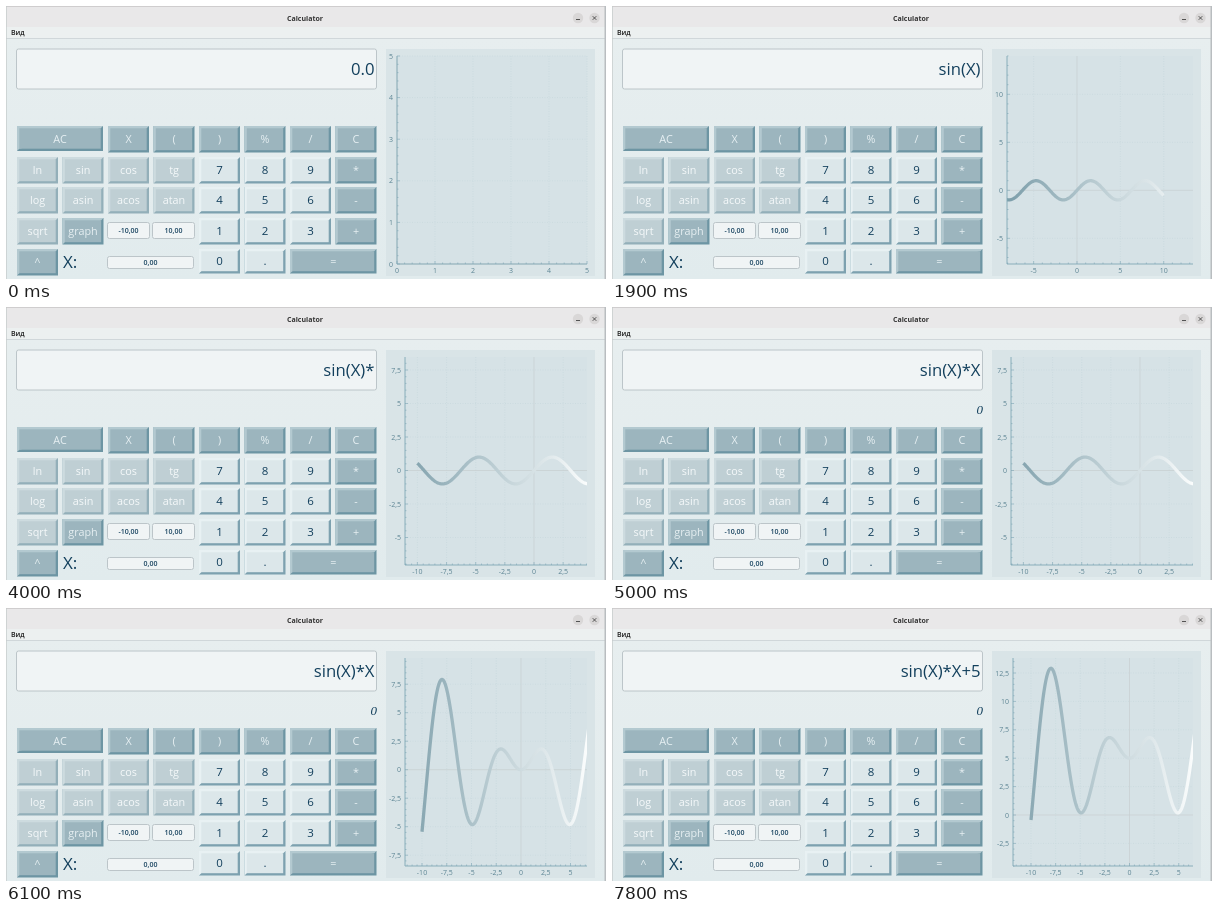
Write an HTML page with a canvas that moves like this. It is 600 px wide and 273 px high and loops after 8000 ms.

```html
<!DOCTYPE html>
<html lang="ru">
<head>
<meta charset="utf-8">
<title>Calculator</title>
<style>
  html, body { margin: 0; width: 100%; height: 100%; overflow: hidden; background: #e4ecee; }
  canvas { display: block; width: 600px; height: 273px; }
</style>
</head>
<body>
<canvas id="stage"></canvas>
<script>
const W = 600, H = 273, LOOP = 8000, STEP = 100;
const SANS = '"Open Sans", "Noto Sans", sans-serif';
const INK = '#123f5c';
const PLOT = { top: 50, right: 581, bottom: 258 };

const canvas = document.getElementById('stage');
const ctx = canvas.getContext('2d');
const dpr = window.devicePixelRatio || 1;
canvas.width = W * dpr;
canvas.height = H * dpr;
ctx.scale(dpr, dpr);

// Each view: pixels per unit and pixel position of zero, for x then y
const START = [38, 391, 41.6, 258];
const WIDE = [8.67, 465, 9.6, 184.3];
const CLOSE = [19.6, 518, 21.5, 172.5];
const MID = [11.66, 528, 13.4, 163.5];
const FAR = [4.475, 490.4, 5.01, 154];
const PEAKS = [9.9, 515, 11.4, 161.7];
const RAISED = [9.85, 517.5, 11.36, 207];

const views = [
  [0, START], [1200, START], [1900, WIDE], [2100, WIDE], [2900, CLOSE],
  [3300, MID], [5100, MID], [5600, FAR], [6100, PEAKS], [7300, PEAKS],
  [7800, RAISED], [LOOP, RAISED]
];
const typed = [
  [0, '0.0'], [400, 'sin('], [800, 'sin(X'], [1000, 'sin(X)'], [3800, 'sin(X)*'],
  [4400, 'sin(X)*X'], [6800, 'sin(X)*X+'], [7100, 'sin(X)*X+5']
];
const curves = [
  [0, null], [1300, Math.sin], [5200, x => Math.sin(x) * x], [7300, x => Math.sin(x) * x + 5]
];

const latest = (list, t) => list.filter(e => e[0] <= t).pop()[1];

// Geometric zoom around a fixed point
function zoom(s0, o0, s1, o1, k) {
  if (s0 === s1) return [s0, o0 + (o1 - o0) * k];
  const s = s0 * Math.pow(s1 / s0, k);
  return [s, o0 + (o1 - o0) * (s - s0) / (s1 - s0)];
}

function viewAt(t) {
  const i = views.findIndex(v => v[0] > t);
  const [ta, a] = views[i - 1], [tb, b] = views[i];
  const k = (t - ta) / (tb - ta);
  return [...zoom(a[0], a[1], b[0], b[1], k), ...zoom(a[2], a[3], b[2], b[3], k)];
}

function text(s, x, y, size, color, align = 'center', style = '500', family = SANS) {
  ctx.font = `${style} ${size}px ${family}`;
  ctx.fillStyle = color;
  ctx.textAlign = align;
  ctx.fillText(s, x, y);
}

function rect(x, y, w, h, color) {
  ctx.fillStyle = color;
  ctx.fillRect(x, y, w, h);
}

function line(x1, y1, x2, y2, color, width = 0.7) {
  ctx.strokeStyle = color;
  ctx.lineWidth = width;
  ctx.beginPath();
  ctx.moveTo(x1, y1);
  ctx.lineTo(x2, y2);
  ctx.stroke();
}

function field(x, y, w, h) {
  ctx.beginPath();
  ctx.roundRect(x + 0.5, y + 0.5, w - 1, h - 1, 2);
  ctx.fillStyle = '#f0f4f5';
  ctx.fill();
  ctx.strokeStyle = '#bcc5c9';
  ctx.lineWidth = 1;
  ctx.stroke();
}

const kinds = {
  dark: { face: '#9cb5be', lit: '#b3c9d0', shade: '#6d95a3', ink: '#e6eff2' },
  soft: { face: '#bfcfd4', lit: '#cddbdf', shade: '#93afb9', ink: '#f5f9fa' },
  digit: { face: '#dce7ea', lit: '#e8f1f3', shade: '#7da1af', ink: INK }
};

function button(label, x, y, w, h, kind) {
  const c = kinds[kind], b = 2.3;
  rect(x, y, w, h, c.shade);
  ctx.fillStyle = c.lit;
  ctx.beginPath();
  ctx.moveTo(x, y + h);
  ctx.lineTo(x, y);
  ctx.lineTo(x + w, y);
  ctx.lineTo(x + w - b, y + b);
  ctx.lineTo(x + b, y + h - b);
  ctx.fill();
  rect(x + b, y + b, w - 2 * b, h - 2 * b, c.face);
  text(label, x + w / 2, y + h / 2 + 4, kind === 'digit' ? 11.5 : 10.8, c.ink);
}

const COLS = [11, 56.5, 102, 147.5, 193, 238.5, 284, 329.5];
const ROWS = [120, 151, 181, 212, 243];
const keys = [
  ['', '', 'X', '(', ')', '%', '/', 'C'],
  ['ln', 'sin', 'cos', 'tg', '7', '8', '9', '*'],
  ['log', 'asin', 'acos', 'atan', '4', '5', '6', '-'],
  ['sqrt', 'graph', '', '', '1', '2', '3', '+'],
  ['^', '', '', '', '0', '.', '', '']
];

function kindOf(key) {
  if (/^[\d.]$/.test(key)) return 'digit';
  return key.length > 1 && key !== 'graph' ? 'soft' : 'dark';
}

function drawWindow() {
  const bg = ctx.createLinearGradient(0, 30, 0, H);
  bg.addColorStop(0, '#e7eeef');
  bg.addColorStop(1, '#e1ebed');
  rect(0, 0, W, H, bg);
  rect(0, 0, W, 21, '#e9e8e9');
  rect(0, 0, W, 1, '#cfcdce');
  rect(0, 21, W, 11, '#ecf0f0');
  rect(0, 32, W, 0.8, '#cbd3d5');
  rect(598.5, 0, 1.5, H, '#b9bdc0');
  rect(0, 0, 0.7, H, '#c5caca');
  text('Calculator', 299, 14.5, 7, '#343434', 'center', 'bold');
  text('Вид', 5, 29.3, 7, '#1a1a1a', 'left', '600');
  for (const x of [572, 588.5]) {
    ctx.fillStyle = '#d9d7d7';
    ctx.beginPath();
    ctx.arc(x, 12, 5.2, 0, 2 * Math.PI);
    ctx.fill();
  }
  line(570, 13.5, 574, 13.5, '#444', 0.9);
  line(586.7, 10.2, 590.3, 13.8, '#444', 0.9);
  line(590.3, 10.2, 586.7, 13.8, '#444', 0.9);
}

function drawKeys() {
  button('AC', 11, 120, 86, 25, 'dark');
  keys.forEach((row, r) => row.forEach((key, c) => {
    if (!key) return;
    const h = r === 4 && c > 0 ? 24.5 : 26.5;
    button(key, COLS[c], ROWS[r], 41, h, kindOf(key));
  }));
  button('=', 284, 243, 86.5, 24.5, 'dark');
  field(101, 216, 43, 17);
  field(146, 216, 43, 17);
  field(101, 250, 87, 13);
  text('-10,00', 122.5, 227.2, 7, INK, 'center', '600');
  text('10,00', 167.5, 227.2, 7, INK, 'center', '600');
  text('0,00', 144.5, 259.2, 7, INK, 'center', '600');
  text('X:', 57, 262, 17, INK, 'left');
}

// About five ticks, on steps of 1, 2, 2.5, 5 or 10
function tickStep(range) {
  const raw = range / 5;
  const mag = Math.pow(10, Math.floor(Math.log10(raw) + 1e-9));
  const m = [1, 2, 2.5, 5, 10].reduce((a, b) =>
    Math.abs(b - raw / mag) < Math.abs(a - raw / mag) ? b : a);
  return { step: m * mag, parts: m === 2 ? 4 : 5 };
}

function ticks(lo, hi) {
  const { step, parts } = tickStep(hi - lo);
  const sub = step / parts, eps = step * 0.01, out = [];
  for (let i = Math.ceil((lo - eps) / sub); i * sub <= hi + eps; i++) {
    out.push({ v: +(i * sub).toFixed(6), major: i % parts === 0 });
  }
  return out;
}

const label = v => String(v).replace('.', ',');

function drawPlot(view, fn) {
  const [sx, ox, sy, oy] = view;
  const { top, right, bottom } = PLOT;
  const px = x => ox + x * sx, py = y => oy - y * sy;
  const yTicks = ticks((oy - bottom) / sy, (oy - top) / sy);
  ctx.font = `7px ${SANS}`;
  const widest = Math.max(...yTicks.filter(t => t.major).map(t => ctx.measureText(label(t.v)).width));
  const left = Math.round(387 + widest);
  const xTicks = ticks((left - ox) / sx, (right - ox) / sx);

  rect(380, 43, 209, 227, '#d9e4e7');
  rect(left, top, right - left, bottom - top, '#d6e2e6');

  const grid = (t, x1, y1, x2, y2) => {
    if (!t.major) return;
    ctx.setLineDash(t.v === 0 ? [] : [1, 1.5]);
    line(x1, y1, x2, y2, t.v === 0 ? '#c8cfd0' : '#c8d8dd');
  };
  xTicks.forEach(t => grid(t, px(t.v), top, px(t.v), bottom));
  yTicks.forEach(t => grid(t, left, py(t.v), right, py(t.v)));
  ctx.setLineDash([]);

  if (fn) drawCurve(fn, left, sx, ox, py);

  const axis = '#7fa7b5', ink = '#5c8493';
  line(left, top, left, bottom, axis, 0.9);
  line(left, bottom, right, bottom, axis, 0.9);
  for (const t of xTicks) {
    line(px(t.v), bottom, px(t.v), bottom - (t.major ? 3 : 1.5), axis, 0.6);
    if (t.major) text(label(t.v), px(t.v), 266.5, 7, ink);
  }
  for (const t of yTicks) {
    line(left, py(t.v), left + (t.major ? 3 : 1.5), py(t.v), axis, 0.6);
    if (t.major) text(label(t.v), left - 4, py(t.v) + 2.6, 7, ink, 'right');
  }
}

function drawCurve(fn, left, sx, ox, py) {
  const { top, right, bottom } = PLOT;
  const shade = ctx.createLinearGradient(392, 0, 582, 0);
  shade.addColorStop(0, '#7a9ca8');
  shade.addColorStop(1, '#fbfdfd');
  ctx.save();
  ctx.beginPath();
  ctx.rect(left, top, right - left, bottom - top);
  ctx.clip();
  ctx.beginPath();
  const from = Math.max(ox - 10 * sx, left - 2), to = Math.min(ox + 10 * sx, right + 2);
  for (let x = from; x <= to; x += 0.5) ctx.lineTo(x, py(fn((x - ox) / sx)));
  ctx.strokeStyle = shade;
  ctx.lineWidth = 3.3;
  ctx.lineJoin = 'round';
  ctx.stroke();
  ctx.restore();
}

function draw(t) {
  drawWindow();
  field(10, 42.5, 361, 41);
  text(latest(typed, t), 368.5, 69.3, 16.7, INK, 'right');
  if (t >= 5000) text('0', 371, 106.5, 13, INK, 'right', 'italic', '"Liberation Serif", serif');
  drawKeys();
  drawPlot(viewAt(t), latest(curves, t));
}

const begin = performance.now();
function frame() {
  const t = (performance.now() - begin) % LOOP;
  draw(Math.floor(t / STEP) * STEP);
  requestAnimationFrame(frame);
}
frame();
</script>
</body>
</html>
```
